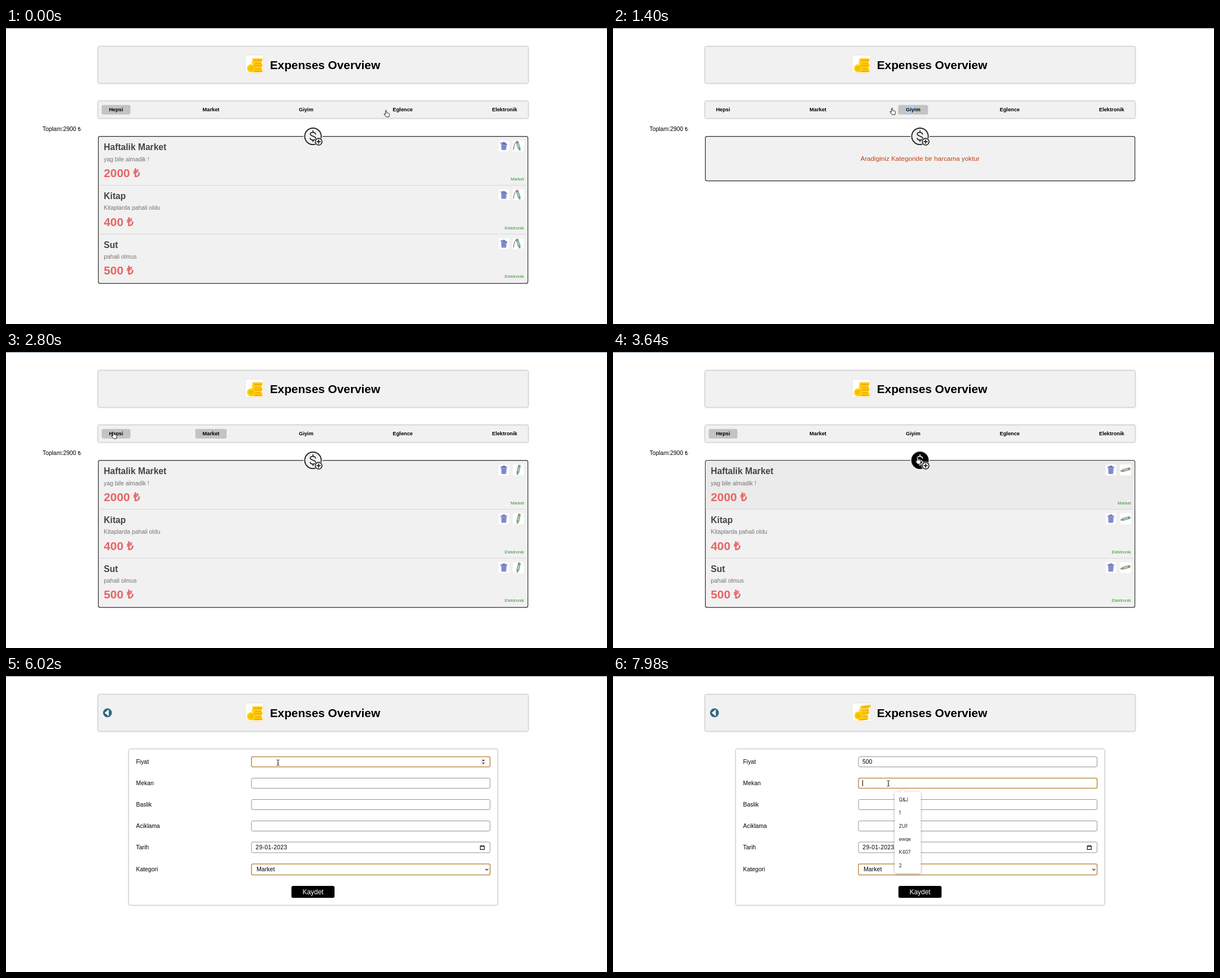
An HTML page that plays this animation: 1065 by 526 pixels, repeating every 8000 ms.

```html
<!DOCTYPE html>
<html lang="tr">
<head>
<meta charset="utf-8">
<title>Expenses Overview</title>
<style>
  html, body { margin: 0; width: 100%; height: 100%; overflow: hidden; background: #fff; }
  svg { display: block; width: 1065px; height: 526px; }
  text { font-family: "Liberation Sans", Arial, sans-serif; font-size: 10.4px; white-space: pre; }
  .b { font-weight: bold; }
  .card { fill: #f1f1f1; stroke: #cfcfcf; filter: drop-shadow(0 0 1px rgba(0,0,0,.25)); }
  .input { fill: #fff; stroke: #929292; }
  .focus { stroke: #bd8f4c; stroke-width: 1.5; }
  .line { fill: none; stroke: #111; stroke-width: 1.6; stroke-linecap: round; }
  .menu text { font: 8.4px Inter, sans-serif; fill: #222; }
</style>
</head>
<body>
<svg id="stage" viewBox="0 0 1065 526"></svg>
<script>
const LOOP = 8000, STEP = 70;
const stage = document.getElementById('stage');

const text = (x, y, str, size = 10.4, fill = '#000', extra = '') =>
  `<text x="${x}" y="${y}" fill="${fill}" style="font-size:${size}px" ${extra}>${str}</text>`;
const rect = (x, y, w, h, r, attrs) =>
  `<rect x="${x}" y="${y}" width="${w}" height="${h}" rx="${r}" ${attrs}/>`;
const path = (d, attrs) => `<path d="${d}" ${attrs}/>`;
const BOLD = 'class="b"', MID = 'text-anchor="middle"', END = 'text-anchor="end"';

const TABS = [['Hepsi', 195, 51], ['Market', 363.2, 55.5], ['Giyim', 531.8, 53], ['Eglence', 703, 61], ['Elektronik', 883.6, 70]];
const ROWS = [
  ['Haftalik Market', 'yag bile almadik !', 2000, 'Market'],
  ['Kitap', 'Kitaplarda pahali oldu', 400, 'Elektronik'],
  ['Sut', 'pahali olmus', 500, 'Elektronik']
];
const ROW_H = 86.8;
const FIELDS = [['Fiyat', 143.5, 18], ['Mekan', 181.5, 18], ['Baslik', 219.5, 18], ['Aciklama', 257.5, 18], ['Tarih', 295, 19], ['Kategori', 334, 19.5]];
const HINTS = ['Q&amp;J', '1', 'ZUF', 'ewqe', 'K407', '2'];

const coins = () => {
  const slices = [0, 1, 2, 3, 4].map(i =>
    `<g class="slice">${rect(i % 2 ? 435.5 : 436.8, 54 + i * 4.9, 17.8, 4.9, 1, `fill="${i % 2 ? '#ffd21c' : '#ffc400'}"`)}
     ${rect(440, 57.4 + i * 4.9, 12.5, 1.3, .6, 'fill="#e89a00"')}</g>`).join('');
  return rect(424, 48, 32.5, 32.5, 3, 'fill="#fff" stroke="#e3e3e3"') + slices +
    `<g id="coin"><circle cx="434.3" cy="71.8" r="7.3" fill="#ffd400"/>
     <circle cx="434.3" cy="71.8" r="4.6" fill="#f6bd00"/></g>`;
};

const trash = `<g transform="translate(882.2 209.5)">${rect(-9.5, -9.7, 19, 19.4, 3, 'fill="#fff"')}
  ${path('M-4.3-3.3h8.6l-.7 10h-7.2z', 'fill="#93a3de" stroke="#5c6db5" stroke-width=".9"')}
  ${path('M-1.7-2v7.4M0-2v7.4M1.7-2v7.4', 'stroke="#5c6db5" stroke-width=".8"')}
  <g class="lid">${path('M-5.4-4.8h10.8M-1.8-6.6h3.6', 'stroke="#5c6db5" stroke-width="1.7" stroke-linecap="round"')}</g></g>`;

const pencil = `<g transform="translate(908 209.5)">${rect(-10, -9.7, 20, 19.4, 3, 'fill="#fff"')}
  ${path('M-8.5 7Q-8-5-3-7.2', 'class="arc" fill="none" stroke="#444" stroke-width=".9"')}
  <g class="pencil">${rect(-1.8, -8.6, 3.6, 3, 1, 'fill="#ef7f8c" stroke="#555" stroke-width=".6"')}
  ${rect(-1.8, -5.8, 3.6, 10.2, 0, 'fill="#9edcae" stroke="#4b6b55" stroke-width=".7"')}
  ${path('M-1.8 4.4h3.6L0 8.8z', 'fill="#f3d3a7" stroke="#444" stroke-width=".6"')}
  ${path('M-.7 7L0 9 .7 7z', 'fill="#222"')}</g></g>`;

const row = ([title, note, price, tag], i) => `<g class="row" transform="translate(0 ${i * ROW_H})">
  ${rect(164.2, 193.2, 760, 86, 2, 'class="shade" fill="#ebebeb"')}
  ${i ? path('M164 192.7h760.5', 'stroke="#d8d8d8"') : ''}
  ${text(173.3, 217, title, 15.6, '#444', BOLD)}${text(173.3, 236.5, note, 10.4, '#757575')}
  ${text(173.3, 264.8, price + ' ₺', 20.8, '#e86464', BOLD)}
  ${text(918, 270.8, tag, 7.8, '#35912f', END)}${trash}${pencil}</g>`;

const field = ([label, y, h]) => text(230.5, y + h / 2 + 3.5, label) +
  rect(435, y, 422.8, h, 2.5, 'class="input"');

stage.innerHTML = `
  ${rect(0, 0, 1065, 1, 0, 'fill="#8796a3"')}
  ${rect(163, 32.8, 762.4, 65.4, 2.5, 'class="card"')}
  ${coins()}
  ${text(467.7, 72.6, 'Expenses Overview', 20.8, '#000', BOLD)}

  <g id="list">
    ${rect(163, 129.8, 762.4, 30.6, 2.5, 'class="card"')}
    ${TABS.map(([, x, w]) => rect(x - w / 2, 136.8, w, 17, 3, 'class="tab" fill="#c3c3c3"')).join('')}
    ${rect(518.8, 138.8, 18, 11.8, 0, 'id="mark" fill="#b4d3f2"')}
    ${TABS.map(([name, x]) => text(x, 148.2, name, 9.25, '#000', BOLD + MID.padStart(MID.length + 1))).join('')}
    ${text(64.8, 182.8, 'Toplam:2900 ₺')}
    ${rect(163.6, 192.6, 761.2, 261, 3, 'id="panel" fill="#f1f1f1" stroke="#2b2b2b" stroke-width="1.2"')}
    ${ROWS.map(row).join('')}
    ${text(544, 236, 'Aradiginiz Kategoride bir harcama yoktur', 11.7, '#c4410f', 'id="none" ' + MID)}
    <circle cx="544" cy="192.5" r="17" fill="#f1f1f1"/>
    <circle id="disc" cx="544" cy="192.5" r="14.6" stroke="#111" stroke-width="1.7"/>
    ${path('M548.6 188.6c-1-4.2-9.4-4.2-9.4 0s9.6 3.2 9.6 7.4-8.8 4.2-9.8 0M544 182.6v2.8M544 199.2v2.6', 'id="dollar" class="line"')}
    <circle cx="554" cy="202" r="7.6" fill="#f1f1f1"/>
    <circle cx="554" cy="202" r="6" fill="#f4f4f4" stroke="#111" stroke-width="1.5"/>
    ${path('M550.8 202h6.4M554 198.8v6.4', 'class="line"')}
  </g>

  <g id="form">
    <circle cx="179.8" cy="65.4" r="8.6" fill="#dfe6e9"/><circle cx="179.8" cy="65.4" r="7.8" fill="#2d6a80"/>
    ${path('M175.4 65.4l6.2-5.2v10.4z', 'fill="#fff" stroke="#fff" stroke-linejoin="round"')}
    ${rect(217.5, 129.8, 653.6, 277.4, 3, 'class="card" style="fill:#fff"')}
    ${FIELDS.map(field).join('')}
    ${text(442.3, 308.2, '29-01-2023', 10.4, '#000', 'letter-spacing=".3"')}
    ${path('M840.5 302.2h7v6.2h-7zM840.5 302.6h7', 'fill="none" stroke="#111" stroke-width="1.2"')}
    ${path('M842.2 300.6v1.4M845.8 300.6v1.4', 'stroke="#111"')}
    ${text(444, 347.4, 'Market', 10.6)}
    ${path('M849.4 342.6l2.6 2.6 2.6-2.6', 'fill="none" stroke="#222" stroke-width="1.1"')}
    ${rect(505.8, 373, 76.4, 21.2, 3, 'fill="#000"')}
    ${text(544.1, 387.6, 'Kaydet', 11.9, '#fff', MID)}
    <g id="spin">${rect(841, 147, 9.5, 11, 1, 'fill="#efefef"')}
    ${path('M843.4 150.9l2.4-2.6 2.4 2.6zM843.4 154l2.4 2.6 2.4-2.6z', 'fill="#333"')}</g>
    ${text(441.9, 156.2, '', 10.4, '#000', 'id="price"')}
    ${rect(442, 147, 1, 11, 0, 'id="caret"')}
    <g id="menu" class="menu">
      ${path('M502 206h6l5-4 5 4h24.500q3 0 3 3v138.500q0 3-3 3h-40.500q-3 0-3-3v-138.500q0-3 3-3z', 'fill="#fff" style="filter:drop-shadow(0 1px 2px rgba(0,0,0,.35))"')}
      ${HINTS.map((s, i) => `<text x="506.5" y="${222.7 + i * 23.4}">${s}</text>`).join('')}
    </g>
  </g>

  <g id="pointer">
    ${path('M-2.600-5.200q1-1.300 2 0v3.900l3.800.8q1.600.5 1.300 2.200l-.9 4.300h-5l-3.500-4.300q-.6-1.500.9-1.300l1.400 1.200z', 'fill="#fff" stroke="#222" stroke-width="1" stroke-linejoin="round"')}
    ${path('M-2-5v9l2-1.800 1.600 3.300 1.600-.7-1.500-3.200h2.800z', 'fill="#000" stroke="#fff" stroke-width=".7"')}
    ${path('M-2.500-5q2 0 2.500 1q.5-1 2.500-1M0-4v8M-2.500 5q2 0 2.500-1q.5 1 2.500 1M-1.200.8h2.400', 'fill="none" stroke="#222" stroke-width="1"')}
  </g>`;

const $ = id => document.getElementById(id);
const all = sel => [...stage.querySelectorAll(sel)];
const show = (node, on) => node.setAttribute('display', on ? 'inline' : 'none');
const within = (t, a, b) => t >= a && t < b;
const clamp = v => Math.max(0, Math.min(1, v));

// Eased lookup in a [time, ...values] table.
function track(table, t) {
  const i = table.findIndex(k => k[0] > t);
  if (i < 0) return table[table.length - 1].slice(1);
  if (i === 0) return table[0].slice(1);
  const a = table[i - 1], b = table[i];
  const u = (t - a[0]) / (b[0] - a[0]), e = u * u * (3 - 2 * u);
  return a.slice(1).map((v, k) => v + (b[k + 1] - v) * e);
}
// Last value whose time has been reached.
const state = (table, t) => table.filter(k => k[0] <= t).pop()[1];

const POINTER = [
  [0, 675, 152], [210, 693, 150], [700, 695, 150], [910, 690, 149], [1190, 512, 148],
  [1400, 496, 148], [1540, 490, 148], [1780, 400, 149], [1960, 352, 149], [2300, 352, 149],
  [2660, 200, 148], [2800, 192, 148], [3220, 196, 149], [3570, 541, 193], [4340, 541, 193],
  [4550, 500, 172], [4760, 491, 169], [5110, 491, 169], [5300, 482, 154], [6790, 482, 154],
  [7200, 503, 153], [7420, 492, 170], [7700, 488, 191]
];
const HAND = 0, ARROW = 1, BEAM = 2, HIDDEN = 3;
const SHAPE = [[0, HAND], [3300, ARROW], [3540, HAND], [4340, ARROW], [5250, BEAM],
  [6230, HIDDEN], [6790, BEAM], [7400, ARROW], [7600, BEAM]];
const COUNT = [[0, 3], [420, 0], [1890, 1], [2740, 3]];
const PRICE = [[0, ''], [6230, '5'], [6510, '50'], [6650, '500']];
const LIT = [[[-999, 420], [2630, 9999]], [[1890, 2830]], [[1120, 1890]], [[140, 1190]], []];
const PENCIL = [[0, -18], [350, 13], [3150, 13], [3500, 74], [3640, 74], [3920, 20], [4200, -18]];
const LID = [[0, 12], [250, 0], [3900, 0], [4130, 12]];
const TILT = [[0, 0], [500, 0], [700, .6], [900, 0], [2000, 0], [2200, .6], [2400, 0],
  [3950, 0], [4150, .6], [4350, 0], [5250, 0], [5500, .6], [5750, 0], [6500, 0],
  [6800, .6], [7150, 0], [7600, 0], [7910, 1]];

const ui = {};
for (const id of ['list', 'form', 'mark', 'panel', 'none', 'disc', 'dollar', 'spin', 'price', 'caret', 'menu', 'pointer', 'coin']) ui[id] = $(id);
const tabs = all('.tab'), rows = all('.row'), shades = all('.shade'), inputs = all('.input');
const pencils = all('.pencil'), arcs = all('.arc'), lids = all('.lid'), slices = all('.slice');
const shapes = [...ui.pointer.children];

function drawList(t) {
  const count = state(COUNT, t);
  ui.panel.setAttribute('height', count ? ROW_H * count + .8 : 79);
  rows.forEach((r, i) => show(r, i < count));
  show(ui.none, count === 0);
  tabs.forEach((tab, i) => {
    const glow = LIT[i].map(([a, b]) => clamp((t - a) / 140) * (1 - clamp((t - b) / 140)));
    tab.setAttribute('opacity', Math.max(0, ...glow));
  });
  show(ui.mark, within(t, 1260, 1890));
  shades.forEach((s, i) => s.setAttribute('opacity', i ? 0 : clamp((t - 3430) / 140)));
  const hover = t >= 3540;
  ui.disc.setAttribute('fill', hover ? '#000' : '#f1f1f1');
  ui.dollar.style.stroke = hover ? '#fff' : '#111';
  const [angle] = track(PENCIL, t), [lid] = track(LID, t);
  pencils.forEach(p => p.setAttribute('transform', `rotate(${angle})`));
  arcs.forEach(a => a.setAttribute('opacity', clamp(-angle / 12)));
  lids.forEach(l => l.setAttribute('transform', `rotate(${lid} -4 -4)`));
}

function drawForm(t) {
  const active = t >= 7700 ? 1 : t >= 5600 ? 0 : -1;
  inputs.forEach((n, i) => n.classList.toggle('focus', i === active || i === 5));
  show(ui.spin, within(t, 5250, 7700));
  const price = state(PRICE, t);
  ui.price.textContent = price;
  const on = within(t, 5600, 5880) || within(t, 6230, 7000) || within(t, 7350, 7700) || active === 1;
  show(ui.caret, on);
  ui.caret.setAttribute('x', active === 1 ? 442 : 442 + price.length * 5.78);
  ui.caret.setAttribute('y', active === 1 ? 185 : 147);
  show(ui.menu, t >= 7770);
}

function draw(t) {
  const isForm = t >= 4340;
  show(ui.list, !isForm);
  show(ui.form, isForm);
  isForm ? drawForm(t) : drawList(t);

  const [tilt] = track(TILT, t);
  slices.forEach((s, i) => s.setAttribute('transform',
    `translate(${(1.5 - i) * tilt * .9} ${-tilt * (4 - i) * .5}) rotate(${-7 * tilt} 445 ${56 + i * 4.9})`));
  ui.coin.setAttribute('transform', `translate(${tilt * .8} ${-tilt * 1.6})`);

  const [x, y] = track(POINTER, t), shape = state(SHAPE, t);
  ui.pointer.setAttribute('transform', `translate(${x} ${y})`);
  shapes.forEach((s, i) => show(s, i === shape));
}

const start = performance.now();
function tick() {
  const t = (performance.now() - start) % LOOP;
  draw(Math.floor(t / STEP) * STEP);
  requestAnimationFrame(tick);
}
tick();
</script>
</body>
</html>
```
